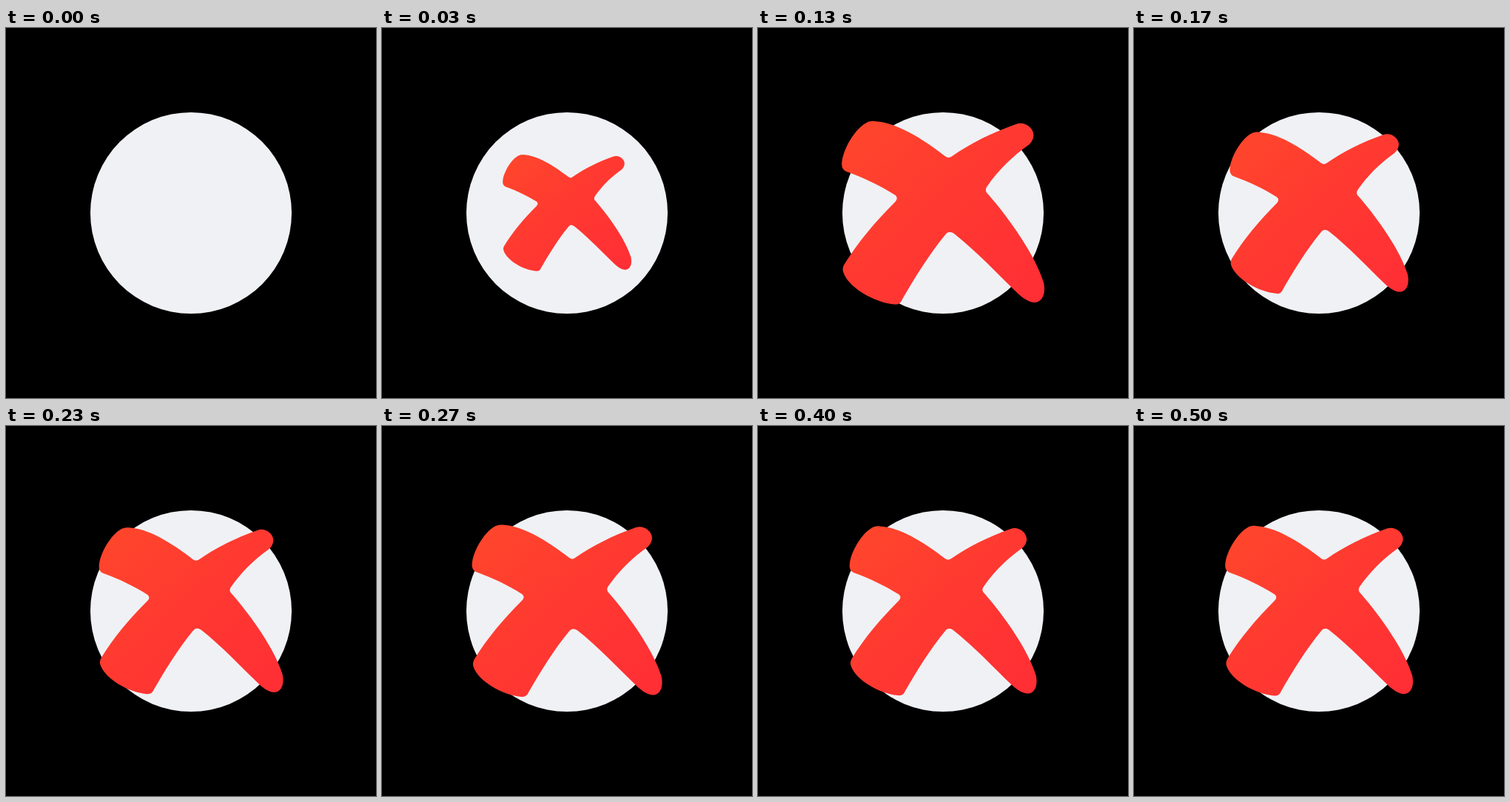
An HTML page for the animation above (5.01 s loop, 500x500 px).

```html
<!DOCTYPE html>
<html lang="en">
<head>
<meta charset="utf-8">
<title>Cross pop</title>
<style>
  html, body { margin: 0; width: 100%; height: 100%; overflow: hidden; background: #000; }
  svg { display: block; width: 100%; height: 100%; }
</style>
</head>
<body>
<svg viewBox="0 0 500 500">
  <defs>
    <linearGradient id="red" x1="0" y1="0" x2="1" y2="1">
      <stop offset="0" stop-color="#ff472b"/>
      <stop offset=".5" stop-color="#ff3831"/>
      <stop offset="1" stop-color="#ff2e35"/>
    </linearGradient>
  </defs>
  <circle cx="250" cy="250" r="136" fill="#f0f1f4"/>
  <path id="cross" fill="url(#red)" transform="scale(0)" d="
    M164 135 C190 136 222 155 253 179 Q257 182 261 179
    C284 163 312 149 342 138.5 C352 135 363 143 363.5 152
    C363.5 157 361 162 357 165 C337 179 319 197 305 217
    C303 220 303 223 306 226 C334 258 366 304 376 337
    C379 350 375 361 366 362 C360 362.5 353 359 345 352
    C318 326 292 298 264 276 C260 273 256 273 253 277
    C233 301 214 332 199 358 C197 363 194 365 189 364.5
    C163 362 131 343 125 324 C124 321 124.5 318 126 315
    C143 287 165 261 190 236 C193 233 193 230 190 227.5
    C172 216 151 206 129 198 C124 196 122.5 191 123.5 185
    C126 167 141 144 153 137.5 C156 135.5 160 134.5 164 135 Z"/>
</svg>
<script>
  const LOOP = 5010, STEPS = 15, PERIOD = 0.4;
  const cross = document.getElementById('cross');

  const elasticOut = t => t >= 1 ? 1 : 1 - 2 ** (-10 * t) * Math.cos(2 * Math.PI * t / PERIOD);

  // 30 steps per second, each starting on a whole 10 ms
  const stepAt = ms => Math.min(STEPS, Math.floor((Math.floor(ms / 10) * 10 + 4) * 0.03));

  function draw(ms) {
    const scale = elasticOut(stepAt(ms) / STEPS);
    cross.setAttribute('transform', `translate(250 250) scale(${scale}) translate(-250 -250)`);
  }

  const start = performance.now();
  function tick() {
    draw((performance.now() - start) % LOOP);
    requestAnimationFrame(tick);
  }
  tick();
</script>
</body>
</html>
```
